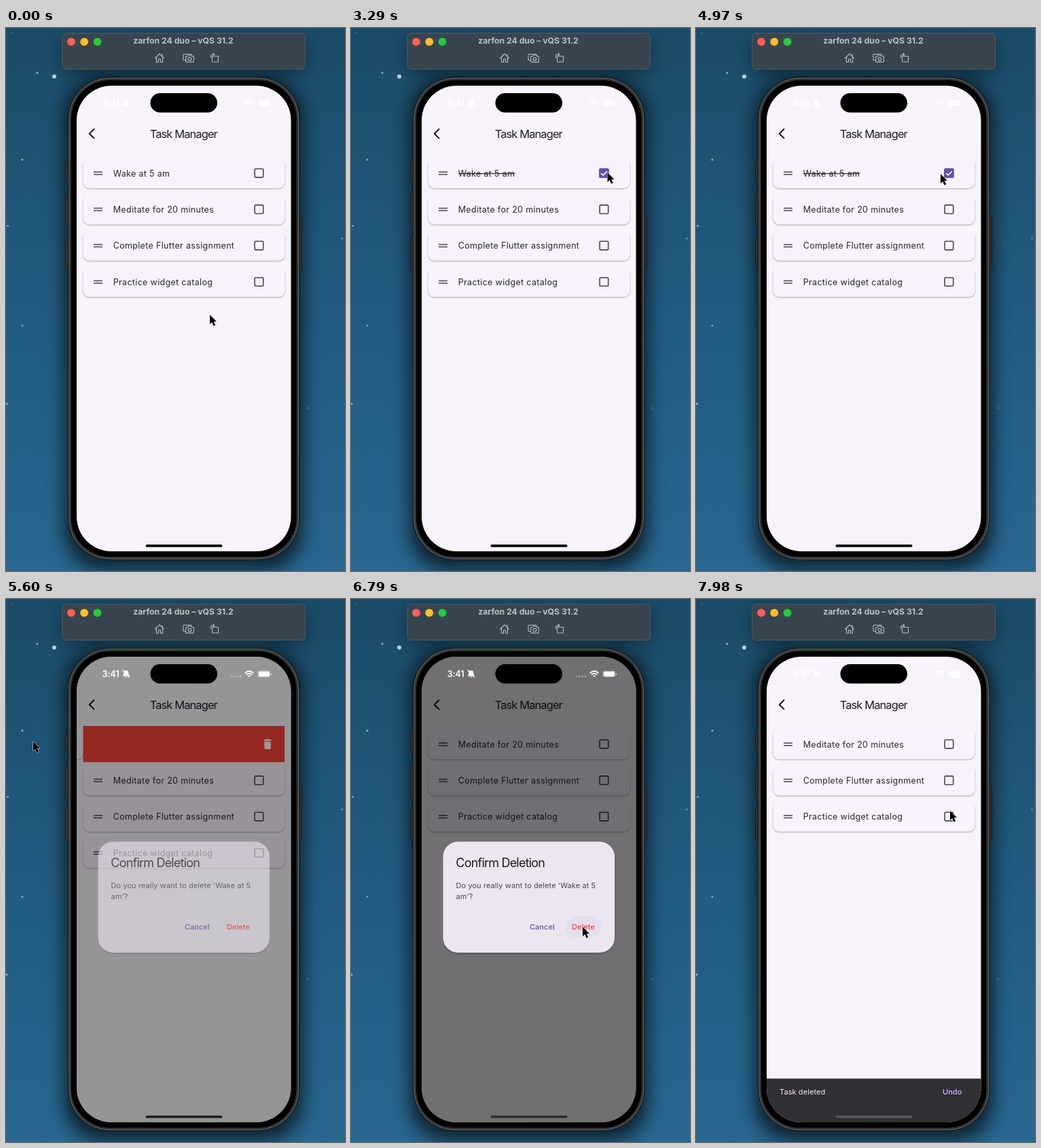
Write an HTML page that moves like this. It is 499 px wide and 800 px high and loops after 8 s.

```html
<!DOCTYPE html>
<html lang="en">
<head>
<meta charset="utf-8">
<title>Task manager</title>
<style>
  html, body { margin: 0; width: 100%; height: 100%; overflow: hidden; background: #235c81; }
  svg { display: block; width: 100vw; height: 100vh; font-family: Inter, "Open Sans", sans-serif; }
  .task { font-size: 12.5px; letter-spacing: .33px; fill: #29272c; }
  .small { font-size: 10.97px; letter-spacing: .1px; }
  .medium { font-weight: 500; letter-spacing: .05px; }
  .line { fill: none; stroke-linecap: round; stroke-linejoin: round; }
</style>
</head>
<body>
<svg viewBox="0 0 499 800">
  <defs>
    <linearGradient id="sky" x2="0" y2="1">
      <stop offset="0" stop-color="#1b4c69"/>
      <stop offset=".5" stop-color="#225a7f"/>
      <stop offset="1" stop-color="#296790"/>
    </linearGradient>
    <clipPath id="screen"><rect x="104" y="85" width="315.5" height="686" rx="51"/></clipPath>
    <filter id="blur" x="-20%" y="-80%" width="140%" height="260%"><feGaussianBlur stdDeviation="13"/></filter>
    <filter id="soft" x="-5%" y="-20%" width="110%" height="150%"><feGaussianBlur stdDeviation=".8"/></filter>
  </defs>

  <rect width="499" height="800" fill="url(#sky)"/>
  <g id="stars" fill="#b9d7e4"></g>

  <!-- Phone and toolbar shadows -->
  <rect x="86" y="74" width="351" height="724" rx="56" opacity=".65" filter="url(#blur)"/>
  <rect x="83" y="16" width="358" height="50" rx="8" opacity=".4" filter="url(#blur)"/>

  <!-- Simulator toolbar -->
  <rect x="82.7" y="7.7" width="358" height="53" rx="6" fill="#38454e" stroke="#4f5d66"/>
  <circle cx="96" cy="20.3" r="5.9" fill="#fe5f57"/>
  <circle cx="115.2" cy="20.3" r="5.9" fill="#febc2e"/>
  <circle cx="134.5" cy="20.3" r="5.9" fill="#28c840"/>
  <text x="261" y="23" text-anchor="middle" font-size="12.2" font-weight="700" fill="#b9c0c5">zarfon 24 duo – vQS 31.2</text>
  <g class="line" stroke="#b4bcc1" stroke-width="1.1">
    <path d="M219.5 44.5L226 38l6.500 6.500M221.500 43v7.500h3v-4.500h3v4.500h3V43M230 41v-2.500"/>
    <path d="M263.500 47.500h-1.500q-1 0-1-1v-7q0-1 1-1h10q1 0 1 1v1"/>
    <path d="M265.500 41.500h2l1-1.500h4l1 1.500h2q.8 0 .8.8v7q0 .8-.8.8h-10q-.8 0-.8-.8v-7q0-.8.8-.8z"/>
    <circle cx="270.500" cy="45.500" r="2.300"/>
    <rect x="303.500" y="41.500" width="9" height="8.500" rx="1"/>
    <path d="M301.500 43.500v-2q0-2.500 2.500-2.500h2.500m-1.500-1.800l1.800 1.800l-1.800 1.800"/>
  </g>

  <!-- Phone body -->
  <g fill="#2d2f31" stroke="#17191b" stroke-width=".8">
    <rect x="87.500" y="197" width="6" height="27" rx="1.500"/>
    <rect x="87.500" y="245" width="6" height="49" rx="1.500"/>
    <rect x="87.500" y="306.500" width="6" height="49" rx="1.500"/>
    <rect x="430" y="278" width="5.500" height="77" rx="1.500"/>
  </g>
  <rect x="91.500" y="72.500" width="340.500" height="711" rx="61" fill="#303133" stroke="#111214"/>
  <rect x="92.800" y="73.800" width="337.900" height="708.400" rx="60" fill="none" stroke="#66686a" stroke-width="1"/>
  <rect x="96" y="77" width="331.500" height="702" rx="57"/>

  <g clip-path="url(#screen)">
    <rect x="104" y="85" width="316" height="687" fill="#f8f3fa"/>
    <path class="line" d="M129.500 149l-6.800 6.700l6.800 6.700" stroke="#111" stroke-width="1.900"/>
    <text x="261.300" y="161.800" text-anchor="middle" font-size="16.400" letter-spacing="-.85" fill="#1d1b20">Task Manager</text>
    <g id="rows"></g>

    <g id="snack">
      <rect x="104" y="706.500" width="316" height="66" fill="#322f35"/>
      <g id="snackText" class="small">
        <text x="123" y="730" fill="#f0eaf2">Task deleted</text>
        <text x="363" y="730" class="medium" fill="#d0bcff">Undo</text>
      </g>
    </g>

    <rect id="barrier" x="104" y="85" width="316" height="687"/>
    <g id="dialog">
      <rect x="135.500" y="359" width="252.500" height="164" rx="22" opacity=".18" filter="url(#soft)"/>
      <rect x="135.500" y="357.500" width="252.500" height="163.500" rx="22" fill="#ece6f0"/>
      <text x="154.300" y="395.300" font-size="18" letter-spacing="-.79" fill="#1d1b20">Confirm Deletion</text>
      <g class="small" fill="#49454f">
        <text x="154.500" y="426">Do you really want to delete 'Wake at 5</text>
        <text x="154.500" y="441.500">am'?</text>
      </g>
      <rect id="pressed" x="316.500" y="467.500" width="52" height="31.500" rx="15.700" fill="#6750a4"/>
      <g class="small medium">
        <text x="263" y="487" fill="#6750a4">Cancel</text>
        <text x="325" y="487" fill="#f44336">Delete</text>
      </g>
    </g>

    <!-- Status bar -->
    <g fill="#fff">
      <text x="141.500" y="115" font-size="12.800" font-weight="600" letter-spacing="-.2">3:41</text>
      <path d="M171.500 113.500q1.800-1.500 1.800-4.500q0-3.500 3.500-4q3.500.5 3.500 4q0 3 1.800 4.500zM175 114.500h3.600q-1.800 2.400-3.600 0"/>
      <path d="M171.500 104.500l10.500 11" stroke="#fff" stroke-width="1.200"/>
      <path d="M331.500 114h15" stroke="#fff" stroke-width="1.800" stroke-dasharray="1.800 2.400" opacity=".5"/>
      <g class="line" stroke="#fff" stroke-width="1.900">
        <path d="M352.300 108.800q5.700-5.200 11.400 0M354.600 111.300q3.400-3 6.800 0"/>
      </g>
      <path d="M358 115.300l-2-2q2-1.500 4 0z"/>
      <rect x="370.500" y="105.700" width="18.500" height="9.600" rx="3" opacity=".4"/>
      <rect x="372" y="107" width="15.800" height="7" rx="1.800"/>
      <rect x="389.700" y="109" width="1.300" height="3" rx=".6" opacity=".6"/>
    </g>
    <rect id="home" x="205.500" y="761" width="113" height="3.800" rx="1.900"/>
  </g>
  <rect x="212.500" y="96" width="98.500" height="28.500" rx="14.250"/>

  <path id="cursor" d="M0 0V14L3.200 11L5.500 16.400L8.200 15.300L5.800 10.100H10Z" stroke="#fff" stroke-width="1" paint-order="stroke"/>
</svg>

<script>
const LOOP = 8000, ROW_HEIGHT = 53.4, CARD_WIDTH = 297;
const REMOVED_AT = 6720;
const $ = id => document.getElementById(id);
const clamp = (v, lo = 0, hi = 1) => Math.min(hi, Math.max(lo, v));
const progress = (t, start, end) => clamp((t - start) / (end - start));
const easeOut = p => 1 - (1 - p) ** 3;
const easeInOut = p => p * p * (3 - 2 * p);

// x, y, radius, opacity
const stars = [[71, 71.5, 3, 1], [46, 66, 1.6, .7], [24, 194, 1.6, .7], [24, 438.5, 1.5, .6],
  [1, 553.5, 1.5, .7], [2.5, 291.5, 1.6, .6], [494.5, 310, 1.5, .4], [444, 560, 1.4, .35], [8, 7, 1, .3]];
$('stars').innerHTML = stars.map(([x, y, r, o]) => `<circle cx="${x}" cy="${y}" r="${r}" opacity="${o}"/>`).join('');

const tasks = ['Wake at 5 am', 'Meditate for 20 minutes', 'Complete Flutter assignment', 'Practice widget catalog'];
const rowMarkup = label => `<g class="row">
  <g class="backdrop">
    <rect x="113.5" y="187" width="296.5" height="53.4" fill="#f44336"/>
    <path fill="#fff" d="M380.300 210h9.400v9.500q0 1.700-1.700 1.700h-6q-1.700 0-1.700-1.700zM379.500 207.300h3l1-1h3l1 1h3v1.700h-11z"/>
  </g>
  <g class="card">
    <rect x="113.5" y="193" width="297" height="44" rx="9.4" opacity=".3" filter="url(#soft)"/>
    <rect x="113.5" y="191" width="297" height="45" rx="9.4" fill="#f7f2fb"/>
    <path d="M129 212.200h13M129 215.700h13" stroke="#49454f" stroke-width="1.5"/>
    <text class="task" x="157.7" y="218.5">${label}</text>
    <circle class="splash" cx="372.4" cy="213.8" r="15.7" fill="#6750a4" opacity="0"/>
    <rect x="366.100" y="207.500" width="12.600" height="12.600" rx="1.3" fill="none" stroke="#49454f" stroke-width="1.6"/>
    <g class="check" opacity="0">
      <rect x="365.3" y="206.7" width="14.2" height="14.2" rx="1.6" fill="#6750a4"/>
      <path d="M368.200 214l2.900 2.900l5.600-5.700" fill="none" stroke="#fff" stroke-width="1.6"/>
    </g>
  </g>
</g>`;
$('rows').innerHTML = tasks.map(rowMarkup).join('');
const rows = [...document.querySelectorAll('.row')];
const [backdrop, card, firstLabel, splash, check] =
  ['.backdrop', '.card', '.task', '.splash', '.check'].map(s => rows[0].querySelector(s));
rows.slice(1).forEach(row => row.querySelector('.backdrop').remove());

// start, end, x, y: glide to (x, y) between the two times
const moves = [[70, 960, 371, 205], [2870, 3220, 377.5, 213], [3850, 4620, 363, 215],
  [4690, 4970, 360, 215], [4970, 5400, 40, 210], [5680, 6340, 341, 483], [6930, 7560, 374, 312]];

function cursorAt(t) {
  let x = 300, y = 422.5;
  for (const [start, end, toX, toY] of moves) {
    const p = easeInOut(progress(t, start, end));
    x += (toX - x) * p;
    y += (toY - y) * p;
  }
  return [x, y];
}

function render(t) {
  const [x, y] = cursorAt(t);
  $('cursor').setAttribute('transform', `translate(${x} ${y})`);

  const removed = t >= REMOVED_AT;
  rows.forEach((row, i) => {
    row.setAttribute('transform', `translate(0 ${(i - removed) * ROW_HEIGHT})`);
  });
  rows[0].style.display = removed ? 'none' : '';

  const ticked = progress(t, 2030, 2200);
  check.setAttribute('opacity', ticked);
  firstLabel.style.textDecoration = ticked > 0 ? 'line-through' : 'none';
  splash.setAttribute('opacity', .1 * progress(t, 1965, 2050) * (1 - progress(t, 2130, 2310)));

  const drag = t < 4690 ? 0 : t >= 5400 ? -CARD_WIDTH : clamp(x - 346, -CARD_WIDTH, 0);
  card.setAttribute('transform', `translate(${drag} 0)`);
  backdrop.style.display = drag < 0 ? '' : 'none';

  const shown = progress(t, 5510, 5660) * (1 - progress(t, 6800, 6950));
  const dim = 1 - (1 - shown) ** 1.4;
  $('dialog').setAttribute('opacity', shown);
  $('barrier').setAttribute('opacity', .54 * dim);
  $('pressed').setAttribute('opacity', .05 * progress(t, 6400, 6580));

  const raised = easeOut(progress(t, 6860, 7110));
  $('snack').setAttribute('transform', `translate(0 ${66 * (1 - raised)})`);
  $('snackText').setAttribute('opacity', progress(t, 6960, 7110));
  const gray = Math.round(Math.max(46 * dim, 86 * raised));
  $('home').setAttribute('fill', `rgb(${gray},${gray},${gray})`);
}

function tick(now) {
  render(now % LOOP);
  requestAnimationFrame(tick);
}
render(0);
requestAnimationFrame(tick);
</script>
</body>
</html>
```
